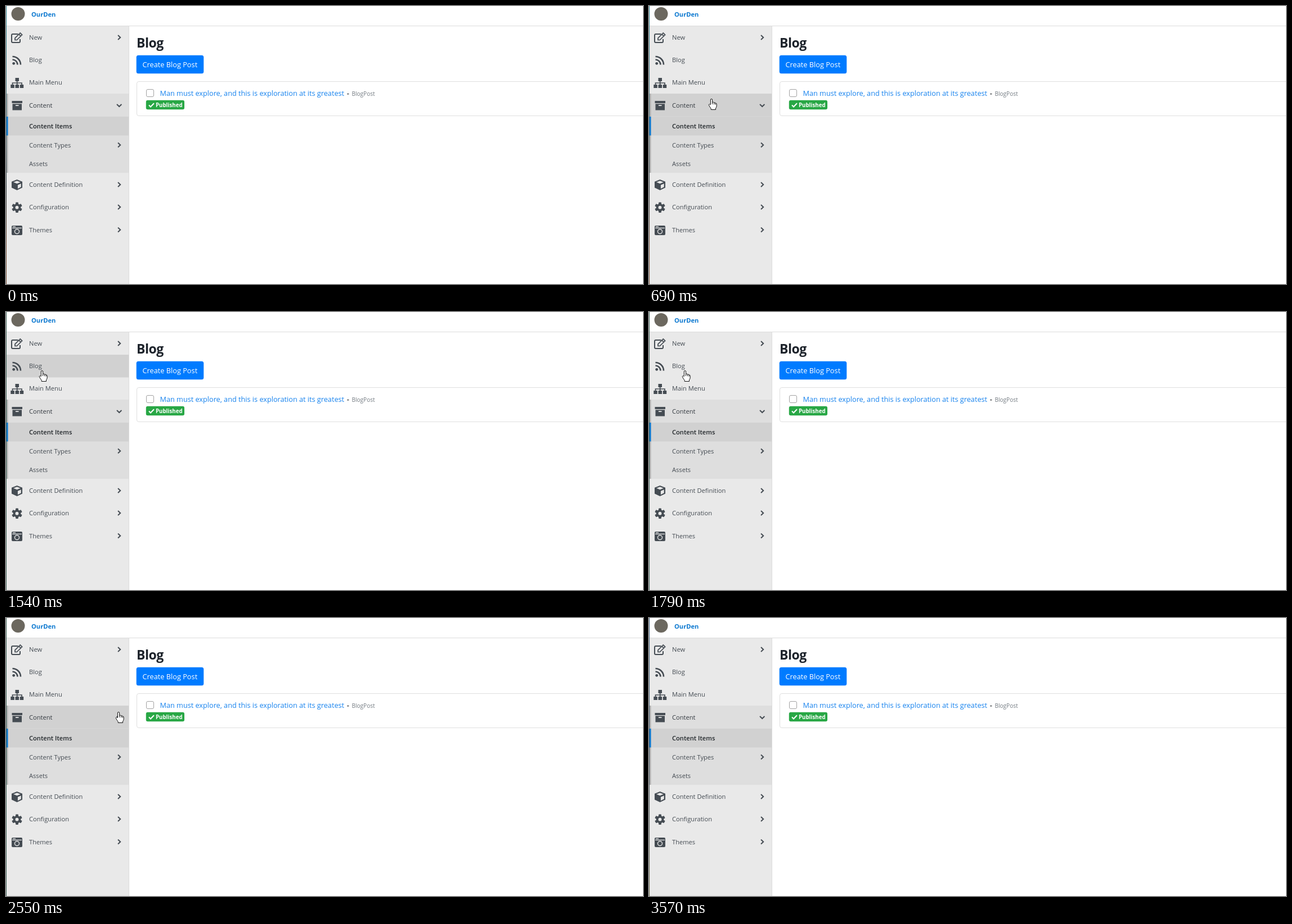
Recreate the animation shown at these times as an HTML page. Size 1132 by 495 pixels, loop 3640 ms.

```html
<!DOCTYPE html>
<html lang="en">
<head>
<meta charset="utf-8">
<title>Blog admin</title>
<style>
html, body { margin: 0; width: 100%; height: 100%; overflow: hidden; background: #fff; }
svg { display: block; width: 1132px; height: 495px; font: 11.15px "Open Sans", "Noto Sans", sans-serif; fill: #454c53; }
.line { fill: none; stroke: #454c53; stroke-width: 2; }
.light { fill: #e9e9e9; }
.medium { font-weight: 500; fill: #343a40; }
.bold { font-weight: 600; fill: #1f2428; }
.blue { fill: #0b78d0; }
</style>
</head>
<body>
<svg viewBox="0 0 1132 495">
  <defs>
    <linearGradient id="dusk" x2="0" y2="1">
      <stop stop-color="#2d8795"/><stop offset=".5" stop-color="#5d7377"/>
      <stop offset=".65" stop-color="#2f3c40"/><stop offset=".86" stop-color="#79543d"/><stop offset="1" stop-color="#80583f"/>
    </linearGradient>
    <linearGradient id="dawn" x2="0" y2="1">
      <stop stop-color="#3f6384"/><stop offset=".6" stop-color="#4c5b63"/><stop offset="1" stop-color="#6d6a48"/>
    </linearGradient>
  </defs>

  <rect width="1132" height="495" fill="#fff"/>
  <rect y="36" width="218" height="459" fill="#e9e9e9"/>
  <path d="M0 35.5H1132M218.5 36V495" stroke="#dcdcdc"/>
  <circle cx="21.5" cy="14" r="12" fill="#6c685f"/>
  <text x="45" y="18.5" class="blue" font-weight="700">OurDen</text>

  <rect x="1" y="156" width="217" height="141" fill="#dedede"/>
  <rect x="1" y="197" width="217" height="33.5" fill="#d1d1d1"/>
  <rect id="hover" x="1" width="217" height="40.5" fill="#d1d1d1"/>
  <rect x="1" y="156" width="2.5" height="141" fill="#b0b0b0"/>
  <rect x="1" y="197" width="2.5" height="33.5" class="blue"/>
  <rect id="edge" width="1" height="495"/>
  <g id="menu"></g>

  <g id="icons">
    <path class="line" d="M21.5 50H12a2 2 0 0 0-2 2V63a2 2 0 0 0 2 2H23a2 2 0 0 0 2-2V59"/>
    <path class="line" style="stroke-width:1.7" d="M16 60.5v-3.4L25.3 48l3.3 3.3-9.3 9.2zM23 50.3l3.3 3.3"/>
    <circle cx="13.7" cy="102.3" r="2.4"/>
    <path class="line" style="stroke-width:2.6" d="M11.5 95.5a9 9 0 0 1 9 9M11.5 90a14.5 14.5 0 0 1 14.5 14.5"/>
    <path d="M16.5 128h6.5v6h-6.5zM8.3 140h6.5v6H8.3zM16.5 140h6.5v6h-6.5zM24.7 140h6.5v6h-6.5z"/>
    <path class="line" style="stroke-width:1.7" d="M19.7 133v8M11.5 141v-4H28v4"/>
    <path d="M10.5 169H29v4H10.5zM11.5 174.3H28V185.5H11.5z"/>
    <path class="light" d="M17 176.3h5.5v1.7H17z"/>
    <path d="M19.5 309l9.5 3.7v10.8l-9.5 4.5-9.5-4.5v-10.8z"/>
    <path class="light" d="M19.5 311.2l6.3 2.5-6.3 2.6-6.3-2.6zM20.9 318.7l5.8-2.5v6.1l-5.8 2.9z"/>
    <g id="gear" transform="translate(19.5 358.7)"><circle r="6.8"/></g>
    <circle class="light" cx="19.5" cy="358.7" r="2.9"/>
    <rect x="10" y="391" width="19" height="17" rx="2"/>
    <path d="M12 392.8h5M11 395.3H28" stroke="#e9e9e9" stroke-width="1.2"/>
    <circle cx="19.5" cy="401.5" r="4" stroke="#e9e9e9" stroke-width="1.4"/>
    <path id="chevrons" class="line"/>
  </g>

  <text x="232" y="74" font-size="23" font-weight="700" letter-spacing="-.5" fill="#1d232b">Blog</text>
  <rect x="231.7" y="87.8" width="119.6" height="32.4" rx="3.5" fill="#007bff"/>
  <text x="242.5" y="109" font-size="12.76" fill="#fff">Create Blog Post</text>
  <rect x="232.5" y="134.5" width="920" height="61" rx="3.5" fill="#fff" stroke="#dfdfdf"/>
  <rect x="249.5" y="148.5" width="13" height="13" rx="2.5" fill="#fff" stroke="#a2a2a2"/>
  <text x="273.5" y="160" font-size="12.7" fill="#1783ee">Man must explore, and this is exploration at its greatest</text>
  <text x="605.7" y="160" font-size="12.7" class="bold">-</text>
  <text x="614.5" y="160" font-size="10.05" fill="#747b82">BlogPost</text>
  <rect id="badge" x="248.8" y="167.8" height="16.4" rx="3" fill="#28a745"/>
  <path id="check" d="M254 176.5l3 3 6-6.2" fill="none" stroke="#fff" stroke-width="2"/>
  <text id="status" y="180" font-size="9.7" font-weight="700" fill="#fff">Published</text>

  <g id="cursor" fill="#fff" stroke="#111" stroke-linejoin="round">
    <path id="hand" d="M-1.6 10.5V2Q-1.6.5 0 .5T1.6 2V6.5Q4.2 5.2 4.6 7.3 7 6.3 7.2 8.2 9.2 7.6 9.2 9.8V13Q9 15.5 7.5 17V19.5H-.8V17.5Q-3 15-4.7 11.3C-5 9.6-3 9-1.6 11M1.6 6.5V10M4.6 7.3V10.3M7.2 8.2V10.8"/>
    <path id="arrow" d="M.5.5V13.6L3.4 10.9 5.4 15.5 7.4 14.6 5.4 10.1H9.5Z"/>
  </g>
  <rect id="tip" x="1107" y="493" width="2" height="2" fill="#555"/>
</svg>
<script>
const el = id => document.getElementById(id);
const show = (id, on) => el(id).setAttribute("visibility", on ? "visible" : "hidden");
const set = (id, name, value) => el(id).setAttribute(name, value);

// label, text centre, chevron, weight
const rows = [
  ["New", 56, ">"], ["Blog", 96], ["Main Menu", 136], ["Content", 177, "v", "medium"],
  ["Content Items", 214, "", "bold"], ["Content Types", 247.5, ">"], ["Assets", 281],
  ["Content Definition", 318, ">"], ["Configuration", 358, ">"], ["Themes", 398.5, ">"]
];
el("menu").innerHTML = rows.map(([label, y, , weight = ""]) =>
  `<text x="41" y="${y + 4}" class="${weight}">${label}</text>`).join("");
set("chevrons", "d", rows.map(([, y, mark]) =>
  mark === ">" ? `M199 ${y - 4}l4.2 4-4.2 4` : mark ? `M197 ${y - 2}l4.2 4 4.2-4` : "").join(""));
el("gear").innerHTML += [0, 60, 120].map(a =>
  `<rect x="-2.4" y="-9.3" width="4.8" height="18.6" rx="1" transform="rotate(${a})"/>`).join("");

const LOOP = 3640, STEP = 75, RELOAD = 1710;
const mix = (a, b, p) => a + (b - a) * p;
const easeOut = (p, power) => 1 - (1 - p) ** power;

// The pointer is sampled in steps; returns its tip, or nothing while hidden.
function pointer(t) {
  const part = (start, first, count) => Math.min(first + Math.floor((t - start) / STEP), count) / count;
  if (t < 230 || t >= 2940) return null;
  if (t < 850) {
    const p = easeOut(part(230, 0, 6), 2);
    return [mix(759, 111, p), mix(435, 165, p)];
  }
  if (t < 2400) {
    const p = part(850, 1, 8);
    return [mix(111, 64, easeOut(p, 1.42)), mix(165, 104, easeOut(p, 1.32))];
  }
  const p = part(2400, 1, 7);
  return [mix(64, 1000, p ** 2.28), mix(104, 403, p ** 1.84)];
}

function draw(now) {
  const t = now % LOOP, at = pointer(t);
  const loading = t >= RELOAD && t < 1790;
  const overMenu = at && at[0] < 218;

  show("cursor", at);
  if (at) {
    set("cursor", "transform", `translate(${at.map(Math.round)})`);
    set("hand", "display", overMenu ? "inline" : "none");
    set("arrow", "display", overMenu ? "none" : "inline");
  }

  const top = overMenu && [36, 76, 116, 156].find(y => at[1] >= y && at[1] < y + 40.5);
  show("hover", top && !(t >= RELOAD && t < 2400));
  if (top) set("hover", "y", top);

  show("icons", !loading);
  show("check", !loading);
  set("badge", "width", loading ? 56 : 68.2);
  set("status", "x", loading ? 253.5 : 266);
  set("edge", "fill", t < 1390 ? "url(#dusk)" : t < 3570 ? "#41665c" : "url(#dawn)");
  show("tip", t >= 3170 && t < 3240);
}

const begin = performance.now();
function tick() {
  draw(performance.now() - begin);
  requestAnimationFrame(tick);
}
tick();
</script>
</body>
</html>
```
